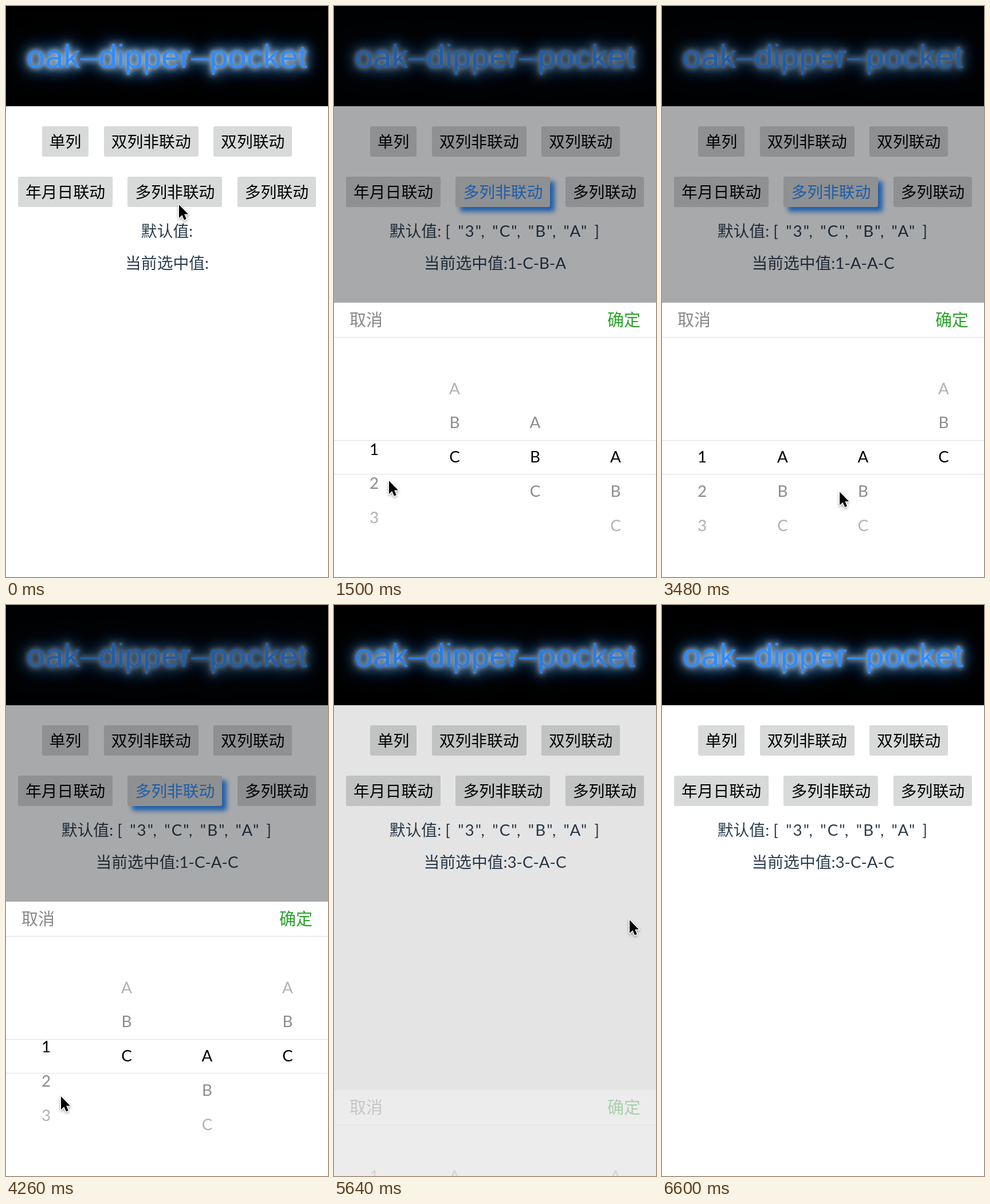
Recreate the animation shown at these times as an HTML page. Size 562 by 997 pixels, loop 6.66 s.

```html
<!DOCTYPE html>
<html lang="zh-CN">
<head>
<meta charset="utf-8">
<style>
  html, body { margin: 0; width: 100%; height: 100%; overflow: hidden; background: #fff; }
  body { position: relative; font: 27.8px/60px Lato, "Noto Sans CJK SC", "Noto Sans CJK", sans-serif; color: #2c3e50; }
  div, svg { position: absolute; white-space: pre; }
  .title {
    left: 0; top: 0; width: 562px; height: 175px; background: #000; color: #2d8cff;
    font: 58px/176px "Liberation Sans", Arial, sans-serif; text-align: center;
    text-shadow: 0 0 10px rgba(255,255,255,.85), 0 0 20px rgba(225,240,255,.8), 0 0 30px #2d8cf0, 0 0 44px #2d8cf0;
  }
  .row { left: 0; width: 562px; display: flex; justify-content: center; gap: 26.4px; }
  .row span { height: 53px; line-height: 54px; padding: 0 13px; border-radius: 3px; background: #d8d9d9; color: #000; }
  .row .active { color: #2d8cff; box-shadow: 8px 8px 8px #2d8cff; }
  .line { left: 0; width: 562px; text-align: center; }
  #list { letter-spacing: 2.15px; word-spacing: 2px; }
  #shade { left: 0; top: 0; width: 562px; height: 997px; background: rgba(0,4,8,.34); }
  #panel { left: 0; top: 518px; width: 562px; height: 479px; background: #fff; }
  .rule { left: 0; width: 562px; height: 1px; background: #dedede; }
  .action { top: 0; font-size: 29px; }
  .item { top: 239px; width: 140px; text-align: center; }
  #cursor { left: 0; top: 0; overflow: visible; filter: drop-shadow(0 2px 2px rgba(0,0,0,.35)); }
</style>
</head>
<body>
<div class="title">oak–dipper–pocket</div>
<div class="row" style="top:210px"><span>单列</span><span>双列非联动</span><span>双列联动</span></div>
<div class="row" style="top:298px"><span>年月日联动</span><span id="chosen">多列非联动</span><span>多列联动</span></div>
<div class="line" style="top:363px">默认值:<span id="gap"> </span><span id="list">[ "3", "C", "B", "A" ]</span></div>
<div class="line" style="top:419px">当前选中值:<span id="value"></span></div>
<div id="shade"></div>
<div id="panel">
  <div class="action" style="left:27px;color:#888">取消</div>
  <div class="action" style="right:27px;color:#2aa32c">确定</div>
  <div class="rule" style="top:60px"></div>
  <div class="rule" style="top:240px"></div>
  <div class="rule" style="top:299px"></div>
</div>
<svg id="cursor" width="20" height="32">
  <path d="M1 2V25L6.3 20L10 28.5L13.8 26.8L10.2 18.6H17Z" stroke="#fff" stroke-width="3" paint-order="stroke" stroke-linejoin="round"/>
</svg>
<script>
const LOOP = 6660, OPEN = 510, CLOSE = 5520, FADE = 300;
const ROW = 59.75, COL = 140.5, SWIPE = 300, SETTLE = 380;
const $ = id => document.getElementById(id);

const wheels = ['123', 'ABC', 'ABC', 'ABC'].map((labels, col) => ({
  labels,
  items: [...labels].map(label => {
    const el = document.createElement('div');
    el.className = 'item';
    el.textContent = label;
    el.style.left = COL * col + 'px';
    $('panel').append(el);
    return el;
  })
}));

// Evenly spaced swipes: which wheel goes to which row
const swipes = [[0, 0], [1, 0], [2, 0], [3, 2], [1, 2], [0, 2]]
  .map(([col, row], i) => ({ col, row, start: 1200 + 595 * i }));

// Pointer stops: [time, x, y]
const stops = [
  [0, 301, 345], [480, 301, 333], [720, 301, 333],
  ...swipes.flatMap(({ col, row, start }) => {
    const x = 95 + COL * col, [from, to] = row ? [886, 735] : [735, 827];
    return [[start, x, from], [start + SWIPE, x, to]];
  }),
  [5040, 478, 618], [5340, 515, 548], [5880, 515, 548], [6480, 441, 421], [6540, 376, 403]
];

const clamp = u => Math.max(0, Math.min(1, u));
const smooth = u => (u = clamp(u), u * u * (3 - 2 * u));
const mix = (a, b, s) => a + (b - a) * s;

// CSS "ease": cubic-bezier(.25, .1, .25, 1)
function ease(x) {
  const curve = (u, a, b) => 3 * u * (1 - u) ** 2 * a + 3 * u * u * (1 - u) * b + u ** 3;
  let lo = 0, hi = 1;
  for (let i = 0; i < 20; i++) {
    const mid = (lo + hi) / 2;
    if (curve(mid, .25, .25) < clamp(x)) lo = mid; else hi = mid;
  }
  return curve(lo, .1, 1);
}

function pointer(t) {
  const next = stops.findIndex(s => s[0] > t);
  if (next < 0) return stops[stops.length - 1].slice(1);
  const [t0, x0, y0] = stops[next - 1], [t1, x1, y1] = stops[next];
  const s = smooth((t - t0) / (t1 - t0));
  return [mix(x0, x1, s), mix(y0, y1, s)];
}

function draw(t) {
  const shown = ease((t - OPEN) / FADE) - ease((t - CLOSE) / FADE);
  $('shade').style.opacity = $('panel').style.opacity = shown;
  $('panel').style.transform = `translateY(${479 * (1 - shown)}px)`;
  $('chosen').classList.toggle('active', t >= 480 && t < CLOSE);

  const turn = [2, 2, 1, 0];
  for (const { col, row, start } of swipes)
    turn[col] = mix(turn[col], row, smooth((t - start) / SETTLE));

  const picked = wheels.map(({ labels, items }, col) => {
    const row = Math.round(turn[col]);
    items.forEach((el, i) => {
      el.style.transform = `translateY(${(i - turn[col]) * ROW}px)`;
      el.style.color = ['#000', '#8c8c8c', '#b2b2b2'][Math.abs(i - row)];
    });
    return labels[row];
  });
  $('gap').hidden = $('list').hidden = t < OPEN;
  $('value').textContent = t < OPEN ? '' : picked.join('-');

  const [x, y] = pointer(t);
  $('cursor').style.transform = `translate(${x}px, ${y}px)`;
  $('cursor').style.visibility = t < 6595 ? 'visible' : 'hidden';
}

const start = performance.now();
function tick() {
  draw((performance.now() - start) % LOOP);
  requestAnimationFrame(tick);
}
tick();
</script>
</body>
</html>
```
